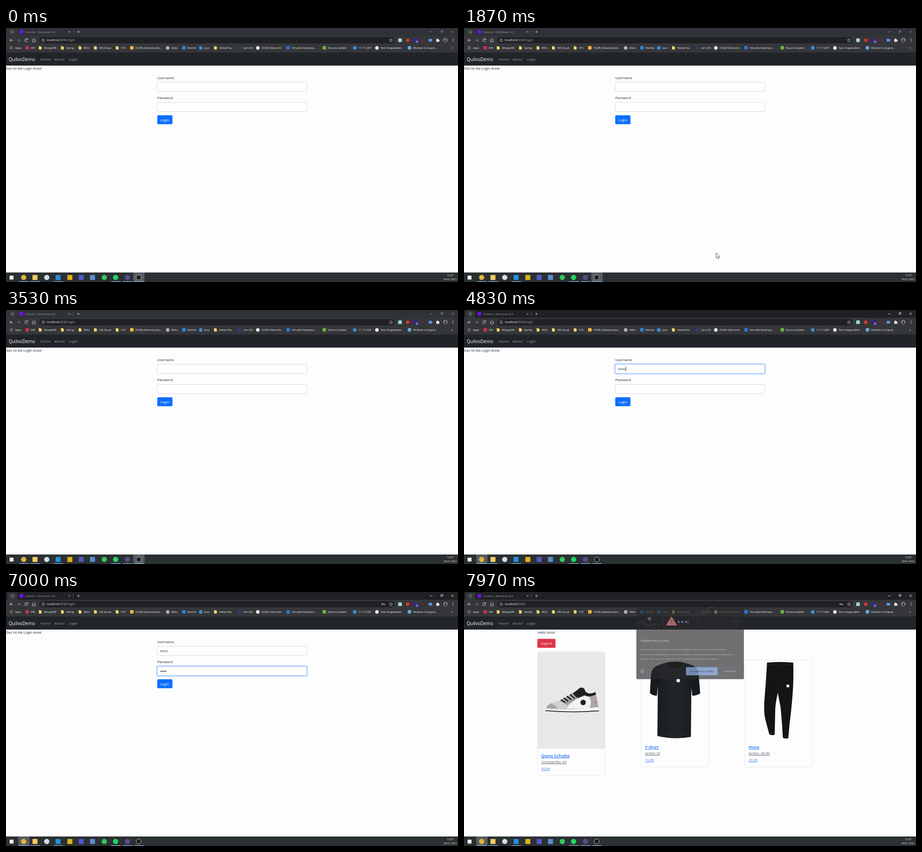
Write an HTML page with a canvas that moves like this. It is 998 by 561 pixels and loops after 8000 ms.

```html
<!DOCTYPE html>
<html lang="de">
<head>
<meta charset="utf-8">
<title>Login</title>
<style>
html, body { margin: 0; width: 100%; height: 100%; overflow: hidden; background: #fdfdfd; }
canvas { display: block; }
</style>
</head>
<body>
<canvas id="stage" width="998" height="561"></canvas>
<script>
const g = document.getElementById('stage').getContext('2d');
const LOOP = 8000;
const USER = 'timo';
const FONT = '"Open Sans", "Noto Sans", sans-serif';
const BLUE = '#0d6efd', INK = '#212529', BAR = '#35363a';

// Timeline in ms
const FOCUS = 3600, USER_KEYS = [4500, 4620, 4700, 4790];
const TAB = 5300, PASS_KEYS = [5750, 5900, 6030, 6170];
const SHOP = 7660, BUBBLE = 7885;
const PATH = [[1700, 570, 545], [1870, 557, 497], [2150, 470, 285], [2500, 374, 110],
  [2600, 366, 92], [2700, 354, 104], [2800, 352, 122]];

const clamp = v => Math.max(0, Math.min(1, v));

function box(x, y, w, h, fill, r = 0) {
  g.fillStyle = fill;
  g.beginPath();
  g.roundRect(x, y, w, h, r);
  g.fill();
}

function frame(x, y, w, h, color, r = 0, lw = 1) {
  g.strokeStyle = color;
  g.lineWidth = lw;
  g.beginPath();
  g.roundRect(x, y, w, h, r);
  g.stroke();
}

function disc(x, y, r, fill) {
  g.fillStyle = fill;
  g.beginPath();
  g.arc(x, y, r, 0, 7);
  g.fill();
}

function ring(x, y, r, color, lw = 1) {
  g.strokeStyle = color;
  g.lineWidth = lw;
  g.beginPath();
  g.arc(x, y, r, 0, 7);
  g.stroke();
}

function line(d, color, lw = 1) {
  g.strokeStyle = color;
  g.lineWidth = lw;
  g.stroke(new Path2D(d));
}

function shape(d, fill) {
  g.fillStyle = fill;
  g.fill(new Path2D(d));
}

// y is the middle of the capitals; returns the text width
function text(s, x, y, size, color = INK, weight = 400, align = 'left') {
  g.font = `${weight} ${size}px ${FONT}`;
  g.textAlign = align;
  g.fillStyle = color;
  g.fillText(s, x, y + size * 0.357);
  return g.measureText(s).width;
}

function link(s, x, y, size, color, weight) {
  const w = text(s, x, y, size, color, weight);
  box(x, Math.round(y + size * 0.36 + 1), w, 0.9, color);
}

function folder(x, y) {
  box(x - 3, y - 3.5, 3.5, 3, '#e8b84a', 0.5);
  box(x - 3, y - 2.5, 6, 6.5, '#fbd978', 0.5);
}

const MARKS = [
  [55, 'KEF', 'sq', '#c8324a'], [84, 'MongoDB'], [133, 'Spring'], [172, 'BOU'],
  [206, 'DB_Visual'], [254, 'VTS'], [286, 'FGDB_Datenvisualis...', 'sq', '#f4b73c'],
  [365, 'Zikko', 'disc', '#b5b0b4'], [401, 'Bremlo', 'sq', '#2b86d0'],
  [438, 'Java', 'disc', '#3a8fd8'], [471, 'KletterTau'],
  [524, 'Lern.OX', 'disc', '#27407c'], [564, 'OOAD Übersicht', 'disc', '#e8eaed'],
  [631, 'Virtuelle Desktops...', 'sq', '#2f73d8'],
  [711, 'Nuvora Gipfelo', 'sq', '#6db33f'], [778, '11.17 UDP', 'disc', '#3a8fd8'],
  [827, 'Text Umgestalten', 'disc', '#e8eaed'],
  [899, 'Multiset in Zugola...', 'sq', '#62a9d8']
];

function browser(t) {
  const active = t >= FOCUS;
  const ctl = active ? '#e8eaed' : '#8b8f94';
  box(0, 0, 998, 18, active ? '#202124' : '#2f3236');
  box(3, 1, 22, 18, BAR, 4);
  box(0, 17, 998, 37, BAR);
  ring(14, 8.5, 3, '#777b80', 1.2);
  line('M12 6.5L16 10.5', '#777b80');
  box(30, 4.5, 8, 8, '#6f10f2', 1);
  text('Columns · Bootstrap v5.0', 42, 8.5, 5.7, '#a5a9ae');
  line('M138 6.5l4 4m0-4l-4 4', '#c4c7cb', 0.8);
  line('M148.5 4v9', '#5f6368', 0.8);
  line('M157 8.5h6m-3-3v6', '#c4c7cb', 0.9);
  line('M936 8.5h5.5M983.5 5.8l5 5m0-5l-5 5', ctl, 0.9);
  frame(960, 6.5, 3.5, 3.5, ctl, 0, 0.8);
  line('M961.5 5.2h3.5v3.5', ctl, 0.7);

  // Navigation buttons and address field
  line('M15 27H8.5m3-3l-3 3 3 3', '#e8eaed');
  line('M25 27h6.5m-3-3l3 3-3 3', '#878b90');
  line('M47.3 25.2a3.2 3.2 0 1 0 .3 2.8M47.8 23.2v2.4h-2.4', '#e8eaed');
  line('M57.5 27.2l4-3.7 4 3.7M58.8 26.5v4h5.4v-4', '#e8eaed', 0.9);
  box(73, 20, 785, 14, '#202124', 7);
  ring(82, 27, 3.2, '#c4c7cb', 0.8);
  line('M82 26.5v2.2M82 25v.7', '#c4c7cb', 0.9);
  const w = text('localhost', 90, 27, 6.7, '#f1f3f4');
  text(t < SHOP ? ':8080/login' : ':8080', 90 + w, 27, 6.7, '#9aa0a6');
  if (t >= PASS_KEYS[0]) {
    ring(831, 27, 1.7, '#c4c7cb', 1);
    line('M833 27h4.5M836 27v2', '#c4c7cb', 1.2);
  }
  line('M850 23.3l1.1 2.5 2.6.2-2 1.8.6 2.6-2.3-1.4-2.3 1.4.6-2.6-2-1.8 2.6-.2z', '#c4c7cb', 0.8);

  // Extensions
  box(866, 23, 8, 8, '#9cd4df', 1);
  disc(887, 27, 3.8, '#d9382e');
  disc(904, 26.5, 3.8, '#3d1ca8');
  box(904.5, 27.5, 6, 6, '#5a3fae', 1);
  text('4', 907.5, 30.5, 4.5, '#fff', 600, 'center');
  box(916, 26, 8, 2.5, '#7a2430', 1);
  box(933, 24, 8, 6, '#5b8fe0', 1);
  box(950, 25, 6, 5.5, '#e8eaed', 0.7);
  disc(952.8, 24.6, 1.4, '#e8eaed');
  disc(956.3, 27.8, 1.3, '#e8eaed');
  disc(970, 27, 5, '#85888b');
  disc(970, 25.5, 1.8, '#33373a');
  shape('M966.5 30.5a3.5 3.5 0 0 1 7 0z', '#33373a');
  for (let i = -1; i < 2; i++) disc(987, 27 + i * 2.6, 0.8, '#e8eaed');

  // Bookmarks
  for (let i = 0; i < 9; i++)
    box(8 + i % 3 * 2.5, 40.5 + Math.floor(i / 3) * 2.5, 1.6, 1.6, ['#e66b5b', '#79b36a', '#6fa0e8'][i % 3]);
  text('Apps', 20, 44, 5.8, '#fff', 500);
  for (const [x, label, kind, color] of MARKS) {
    if (!kind) folder(x - 8.5, 43.5);
    else if (kind === 'disc') disc(x - 8, 44, 3.9, color);
    else box(x - 12, 40, 7.6, 7.6, color, 1);
    text(label, x, 44, 5.8, '#fff', 500);
  }
  text('»', 983.5, 43.5, 7, '#e8eaed');
}

function navbar() {
  box(0, 54, 998, 29, INK);
  text('QuilvoDemo', 6, 69, 10, '#fff');
  [['Home', 76], ['About', 107], ['Login', 138]].forEach(([s, x]) => text(s, x, 69, 8, '#9a9c9e'));
}

const TASKS = [
  [39, 'disc', '#e3b341', 1], [64, 'sq', '#f5cf62', 1], [90, 'disc', '#d8dde6'],
  [115, 'sq', '#2490dc', 1], [141, 'sq', '#e0b21c'], [166, 'sq', '#5059c9'],
  [191, 'sq', '#5a8fd0'], [217, 'disc', '#35c759'], [242, 'disc', '#1ed760', 1],
  [268, 'disc', '#5b4a8c', 1], [293, 'disc', '#1b1d20', 1]
];

function taskbar(t) {
  box(0, 540, 998, 21, '#2b3033');
  box(t < FOCUS ? 281 : 27, 540, 25, 21, '#565c60');
  box(8, 547, 8.5, 8.5, '#f4f6f8');
  for (const [x, kind, color, open] of TASKS) {
    if (kind === 'disc') disc(x, 551, 5.8, color);
    else box(x - 5.5, 545.5, 11, 11, color, 1);
    if (open) box(x - 10, 559.6, 21, 1.4, '#86b9dc');
  }
  ring(293, 551, 5.6, '#c9cdd2', 0.9);
  text('12:27', 981, 546, 5.8, '#fff', 400, 'center');
  text('30.01.2021', 981, 555, 5.8, '#fff', 400, 'center');
}

function field(y, focus) {
  if (focus > 0) frame(333, y - 1, 332, 22, `rgba(13,110,253,${0.25 * focus})`, 3, 2 + focus);
  box(334, y, 330, 20, '#fff', 2);
  frame(334, y, 330, 20, focus > 0.5 ? '#86b7fe' : '#cdd1dc', 2, 0.9);
}

function caret(t, x, y, last) {
  if ((t - last) % 1000 < 500) box(x, y - 5.5, 0.8, 11, '#111');
}

function button(s, x, y, w, color) {
  box(x, y, w, 19.7, color, 2);
  text(s, x + w / 2, y + 10, 7.9, '#fff', 400, 'center');
}

function loginPage(t) {
  text('Das ist die Login Area!', 0, 89, 7.7);
  text('Username', 334, 110, 7.65);
  text('Password', 334, 154.5, 7.65);
  field(120, clamp((t - FOCUS) / 150) * clamp(1 - (t - TAB) / 150));
  field(164.5, clamp((t - TAB) / 150));
  const typed = USER_KEYS.filter(k => t >= k);
  const w = text(USER.slice(0, typed.length), 340.5, 130, 7.7);
  if (t >= FOCUS && t < TAB) caret(t, 340.5 + w, 130, typed[typed.length - 1] || FOCUS);
  const dots = PASS_KEYS.filter(k => t >= k);
  dots.forEach((k, i) => disc(342.2 + i * 3.5, 175, 1.25, INK));
  if (t >= TAB) caret(t, 340.5 + dots.length * 3.5, 174.5, dots[dots.length - 1] || TAB);
  button('Login', 334, 192.7, 33.5, BLUE);
}

function card(x, y, h, title, size, price) {
  box(x, y, 149, h, '#fdfdfd', 2);
  frame(x + 0.3, y + 0.3, 149, h, '#e2e3ea', 2, 0.8);
  const b = y + h;
  link(title, x + 8.5, b - 43, 9.7, '#1468ea', 600);
  link(size, x + 8.5, b - 30, 7.7, '#565d64');
  link(price, x + 8.5, b - 15, 7.7, '#2a78f2');
}

function shoe() {
  box(163, 132.5, 148, 213.5, '#e8e8e8');
  // Upper, then toe and heel panels
  shape('M181 259Q182 250 192 246L210 241L226 232L246 219L257 211Q266 210 268 220Q278 229 291 220Q293 238 298 259Z', '#a9a6a4');
  shape('M192 247Q206 241 214 242L228 250L226 258L206 258Q204 249 192 247Z', '#d2d0cf');
  shape('M230 250L250 235L268 229L276 232Q284 242 277 257L226 258Z', '#f3f2f1');
  // Tongue, collar and laces
  shape('M240 224L250 217Q255 211 260 211Q267 212 268 220Q278 228 290 221L291 226Q278 234 266 228L250 235Z', '#1f1f1f');
  line('M214 238l10 6M220 234l10 7M227 230l10 8M234 226l10 9', '#252525', 3);
  line('M224 246L252 232', '#8b8886', 1.5);
  shape('M181 257Q235 262 297 254L298 261Q240 266 181 262Z', '#f7f7f7');
  line('M180 262Q240 267 298 262.5', '#343434', 2);
  disc(263, 244, 6, '#202020');
  disc(291, 243, 1.8, '#dd4a4a');
}

function shirt() {
  const tone = g.createLinearGradient(411, 0, 521, 0);
  tone.addColorStop(0, '#15181b');
  tone.addColorStop(0.5, '#22262a');
  tone.addColorStop(1, '#15181b');
  shape('M446 156Q466 152 486 156L505 162Q516 167 518 181L521.5 224Q514 229 504 229L502 212L501 320Q465 327 427 318L428 208L426 229Q416 229 410.5 223L413 181Q415 167 428 162Z', tone);
  shape('M447 156Q466 152 485 156Q480 169 466 169Q451 169 447 156Z', '#0c0d0f');
  line('M446 156Q451 171 466 171Q481 171 486 156', '#303236');
  line('M428 208Q430 190 428 182M502 208Q499 190 501 180', '#101214', 1.2);
  line('M428 313Q465 321 500 314', '#2a2c30', 0.7);
  disc(473, 195.5, 4, '#f2f2f2');
}

function trousers() {
  shape('M669 156Q697 153 727 156Q728 190 726 220Q723 260 719 290L716 323Q710 325 704 322Q702 285 699 255L693 223Q687 245 687 268L686 315Q680 318 674 314L665 280Q661 262 664 230Q667 195 669 156Z', '#121416');
  line('M669 161Q697 158 727 161M695 162L694 220', '#26282b', 0.8);
  line('M673 311l13 1M704 318l13 1', '#303236', 0.7);
  disc(715, 207.5, 3.2, '#f2f2f2');
}

function shopPage() {
  text(`Hello ${USER}!`, 162.5, 89, 7.7);
  button('Logout', 162, 103.5, 40, '#dc3545');
  card(162, 132, 273, 'Quno Schuhe', 'Schuhgröße: 43', '59.99');
  card(391, 150, 236, 'T-Shirt', 'Größe: M', '19.99');
  card(620, 150, 236, 'Hose', 'Größe: 30/30', '29.99');
  shoe();
  shirt();
  trousers();
}

function bubble(alpha) {
  g.save();
  g.globalAlpha = alpha;
  box(380.5, 35, 237.5, 157.5, '#292a2d', 2);
  line('M383 70Q392 62 400 70T418 72T431 77M518 48Q532 54 536 42T552 34', '#4a4e53', 1.5);
  line('M405 59h9M407.3 55l4.5 8M411.8 55l-4.5 8', '#c4c7cb', 1);
  frame(440, 51, 76, 29, '#3c4043', 2);
  line('M596 66q4-6 8 0', '#5f6368', 1.2);
  shape('M458 54L471 74H446Z', '#f28b82');
  line('M458.5 61v6M458.5 69.3v1.8', '#202124', 1.6);
  for (let i = 0; i < 3; i++) {
    const x = 474 + i * 8;
    line(`M${x - 2.6} 66h5.2M${x - 1.3} 63.7l2.6 4.6M${x + 1.3} 63.7l-2.6 4.6`, '#8ab4f8', 1.1);
  }
  line('M494.5 62v8', '#8ab4f8');
  text('Passwörter prüfen', 390, 107.5, 7.3, '#fff', 500);
  ['Durch eine Datenpanne auf einer Website oder in einer App wurde Ihr',
    'Passwort preisgegeben. Velumo empfiehlt, Ihre gespeicherten Passwörter zu',
    'überprüfen und Ihr Passwort auf localhost:8080 jetzt zu ändern.'
  ].forEach((s, i) => text(s, 390, 127 + i * 10.5, 5.8, '#d0d3d7'));
  ring(393.5, 175, 3.3, '#e8eaed', 0.9);
  line('M393.5 174.5v2.3M393.5 173v.7', '#e8eaed', 0.9);
  box(490, 166, 70, 18, '#9cc0fb', 2);
  text('Passwörter prüfen', 525, 175, 5.9, '#202124', 500, 'center');
  frame(563.5, 166.5, 46, 17, '#8a8d92', 2, 0.6);
  text('Schließen', 586.5, 175, 5.9, '#b9d3ff', 600, 'center');
  g.restore();
}

// The arrow is not seen while it hovers over a text field.
function pointer(t) {
  const i = PATH.findIndex(p => p[0] > t);
  if (i < 1) return;
  const [a, b] = [PATH[i - 1], PATH[i]];
  const k = (t - a[0]) / (b[0] - a[0]);
  const x = a[1] + (b[1] - a[1]) * k, y = a[2] + (b[2] - a[2]) * k;
  if (x > 334 && x < 664 && (y > 120 && y < 140 || y > 164 && y < 185)) return;
  g.save();
  g.translate(x, y);
  const d = 'M0 0V12L2.8 9.5L4.7 13.5L6.6 12.7L4.8 8.8H8.4Z';
  shape(d, '#fff');
  line(d, '#222', 0.8);
  g.restore();
}

function draw(now) {
  const t = now % LOOP;
  box(0, 0, 998, 561, '#fdfdfd');
  browser(t);
  navbar();
  if (t < SHOP) loginPage(t);
  else shopPage();
  taskbar(t);
  if (t > BUBBLE) bubble(clamp((t - BUBBLE) / 130));
  pointer(t);
}

const start = performance.now();
function tick() {
  draw(performance.now() - start);
  requestAnimationFrame(tick);
}
tick();
</script>
</body>
</html>
```
